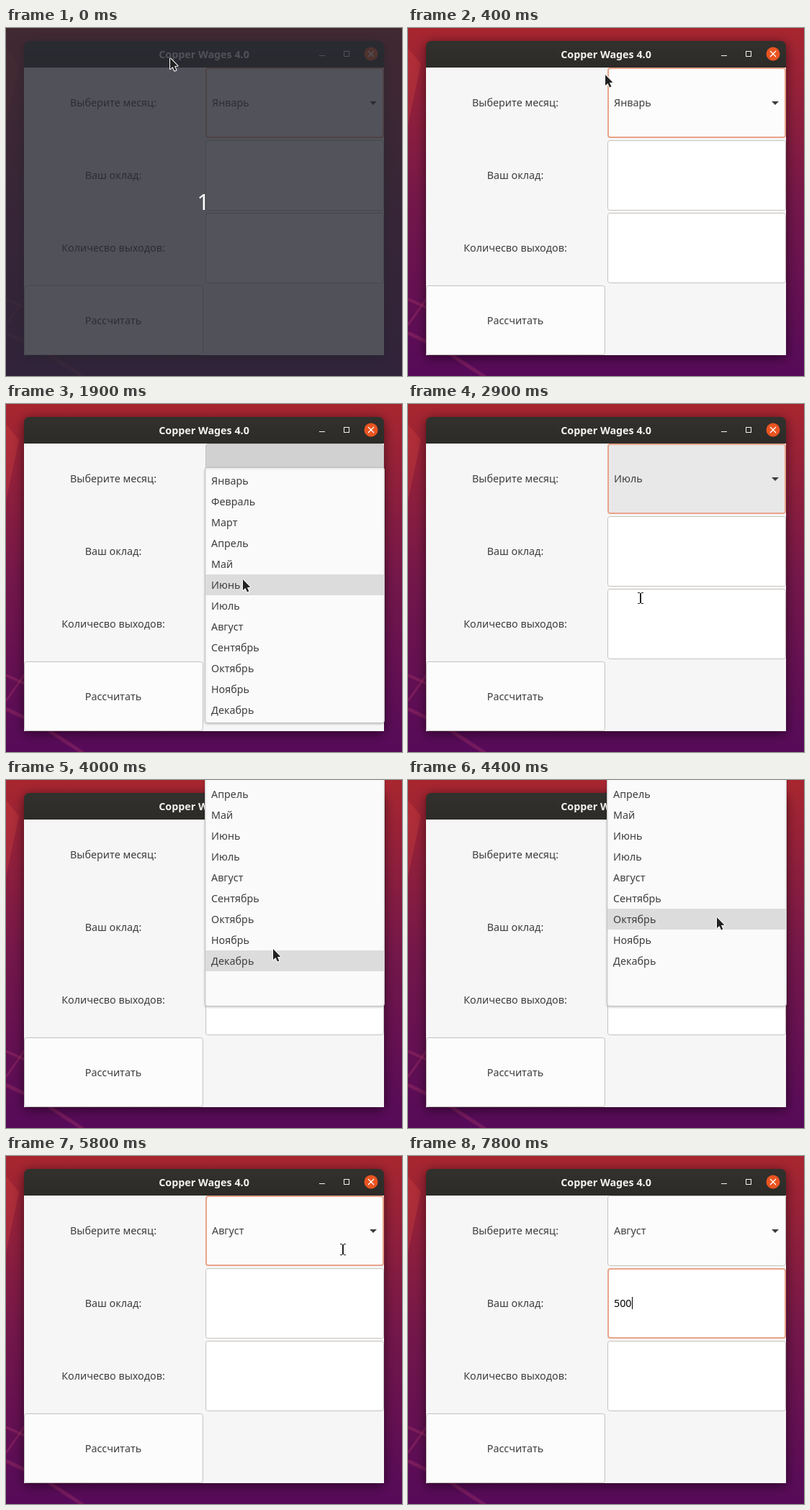
Recreate the animation shown at these times as an HTML page with a canvas. Size 550 px wide and 484 px high, loop 8000 ms.

```html
<!DOCTYPE html>
<html lang="ru">
<head>
<meta charset="utf-8">
<title>Copper Wages 4.0</title>
<style>
  html, body { margin: 0; width: 100%; height: 100%; overflow: hidden; background: #560a59; }
  canvas { display: block; }
</style>
</head>
<body>
<canvas id="stage" width="550" height="484"></canvas>
<script>
const ctx = document.getElementById('stage').getContext('2d');
const WIDTH = 550, HEIGHT = 484, LOOP = 8000, STEP = 100;
const ROW = 29, PITCH = 101, LEFT = 277, PAD = 4;
const INK = '#3d3d3d', PAPER = '#fcfcfc', EDGE = '#c6c2be', FOCUS = '#e9a48b', LIGHT = '#f4f3f1';
const MONTHS = ['Январь', 'Февраль', 'Март', 'Апрель', 'Май', 'Июнь',
  'Июль', 'Август', 'Сентябрь', 'Октябрь', 'Ноябрь', 'Декабрь'];

const GLIDES = [
  { from: 300, to: 800, x: 355, y: 104 },
  { from: 1600, to: 2100, x: 323, y: 270 },
  { from: 3200, to: 3500, x: 365, y: 131 },
  { from: 3900, to: 4100, x: 371, y: 268 },
  { from: 4100, to: 5000, x: 474, y: 128 },
  { from: 5400, to: 5800, x: 468, y: 130 },
  { from: 5800, to: 6500, x: 324, y: 187 }
];
const MENUS = [
  { from: 1400, to: 2900, selected: 0, picked: 6, slack: 0 },
  { from: 3700, to: 5400, selected: 6, picked: 7, slack: 45 }
];
const FOCUS_ENTRY = 6400, TYPING = 7500;

const within = (t, from, to) => t >= from && t < to;
const easeOut = k => 1 - (1 - k) ** 2;

function pointerAt(t) {
  let x = 227, y = 41;
  for (const glide of GLIDES) {
    const k = easeOut(Math.min(1, Math.max(0, (t - glide.from) / (glide.to - glide.from))));
    x += (glide.x - x) * k;
    y += (glide.y - y) * k;
  }
  return [Math.round(x), Math.round(y)];
}

function rect(x, y, w, h, color) {
  ctx.fillStyle = color;
  ctx.fillRect(x, y, w, h);
}

function text(str, x, y, color = INK, align = 'left', font = '14.3px') {
  ctx.font = font + ' "Noto Sans", sans-serif';
  ctx.textAlign = align;
  ctx.fillStyle = color;
  ctx.fillText(str, x, y);
}

function trace(points) {
  ctx.beginPath();
  points.forEach(([x, y]) => ctx.lineTo(x, y));
}

function fill(points, color) {
  trace(points);
  ctx.fillStyle = color;
  ctx.fill();
}

function stroke(points, color, width) {
  trace(points);
  ctx.strokeStyle = color;
  ctx.lineWidth = width;
  ctx.stroke();
}

function box(x, y, w, h, color, edge = EDGE, line = 1) {
  ctx.beginPath();
  ctx.roundRect(x + line / 2, y + line / 2, w - line, h - line, 3);
  ctx.fillStyle = color;
  ctx.fill();
  ctx.strokeStyle = edge;
  ctx.lineWidth = line;
  ctx.stroke();
}

function field(row, color, focused) {
  box(LEFT, 55 + row * PITCH, 248, 98, color, focused ? FOCUS : EDGE, focused ? 2 : 1);
}

function gradient(y0, y1, ...colors) {
  const g = ctx.createLinearGradient(0, y0, 0, y1);
  colors.forEach((color, i) => g.addColorStop(i / (colors.length - 1), color));
  return g;
}

function withShadow(alpha, blur, offset, paint) {
  ctx.save();
  ctx.shadowColor = `rgba(0,0,0,${alpha})`;
  ctx.shadowBlur = blur;
  ctx.shadowOffsetY = offset;
  paint();
  ctx.restore();
}

function wallpaper() {
  rect(0, 0, WIDTH, HEIGHT, gradient(0, HEIGHT, '#a8262f', '#74174a', '#560a59'));
  fill([[0, 28], [18, 50], [0, 135]], 'rgba(215,70,65,.3)');
  const streak = 'rgba(190,60,110,.3)';
  stroke([[0, 377], [26, 389]], streak, 4);
  stroke([[0, 413], [26, 376]], streak, 3);
  stroke([[0, 424], [50, 448], [108, 486]], streak, 5);
}

function windowFrame() {
  withShadow(0.55, 16, 3, () => {
    ctx.beginPath();
    ctx.roundRect(25, 18, 500, 437, [7, 7, 0, 0]);
    ctx.fillStyle = gradient(18, 55, '#32312d', '#2c2b28');
    ctx.fill();
  });
  rect(25, 55, 500, 400, '#f6f6f6');
  text('Copper Wages 4.0', 275, 42, LIGHT, 'center', 'bold 14.3px');

  rect(435, 38, 8, 1, LIGHT);
  ctx.strokeStyle = LIGHT;
  ctx.lineWidth = 1;
  ctx.strokeRect(469.5, 32.5, 7, 7);
  ctx.beginPath();
  ctx.arc(507, 36, 9.5, 0, Math.PI * 2);
  ctx.fillStyle = '#e95420';
  ctx.fill();
  for (const side of [-4, 4]) stroke([[507 - side, 32], [507 + side, 40]], '#fff', 1.3);
}

function comboFill(t, menu) {
  if (menu) return '#d1d1d1';
  if (MENUS.some(m => within(t, m.to, m.to + 200))) return '#e8e8e8';
  if (MENUS.some(m => within(t, m.from - 400, m.from))) return '#fff';
  return PAPER;
}

function form(t, menu) {
  ['Выберите месяц:', 'Ваш оклад:', 'Количесво выходов:', 'Рассчитать'].forEach((label, row) => {
    if (row === 3) box(25, 358, 249, 97, PAPER);
    text(label, 149, 109 + row * PITCH, INK, 'center');
  });

  const editing = t >= FOCUS_ENTRY;
  field(0, comboFill(t, menu), !editing && !menu);
  const month = MENUS.reduce((current, m) => t >= m.to ? m.picked : current, 0);
  text(MONTHS[month], 286, 109);
  fill([[505, 102], [515, 102], [510, 107]], INK);

  field(1, '#fff', editing);
  field(2, '#fff', false);
  if (editing) entry(t);
}

function entry(t) {
  const typed = t < TYPING ? '' : '500'.slice(0, 1 + Math.ceil((t - TYPING) / 200));
  text(typed, 286, 210, '#000');
  const caretOn = t >= TYPING || t < FOCUS_ENTRY + 800;
  if (caretOn) rect(286 + Math.round(ctx.measureText(typed).width), 196, 1, 17, '#000');
}

function dropDown({ selected, slack }, pointerY) {
  const list = 92 - selected * ROW;
  const height = MONTHS.length * ROW + 2 * PAD + slack;
  withShadow(0.2, 3, 1, () => box(LEFT - 1, list - PAD, 250, height, '#fafafa', '#c4c4c4'));
  // The highlight runs slightly ahead of the drawn pointer.
  const active = Math.min(MONTHS.length - 1, Math.floor((pointerY + 8 - list) / ROW));
  rect(LEFT, list + active * ROW, 248, ROW, '#dcdcdc');
  MONTHS.forEach((month, i) => text(month, 285, list + i * ROW + 20));
}

function arrow(x, y) {
  ctx.save();
  ctx.translate(x, y);
  ctx.lineJoin = 'round';
  const shape = [[1, 1], [1, 16], [4.5, 13], [7, 18.5], [9.4, 17.5], [7, 12], [11.5, 11.7], [1, 1]];
  stroke(shape, '#fff', 2);
  fill(shape, '#222');
  ctx.restore();
}

function beam(x, y) {
  for (const [grow, color] of [[1, 'rgba(255,255,255,.8)'], [0, '#222']]) {
    const bar = (dx, dy, w, h) =>
      rect(x + dx - grow, y + dy - grow, w + 2 * grow, h + 2 * grow, color);
    bar(-1, -7, 2, 14);
    for (const dy of [-8, 7]) for (const dx of [-4, 1]) bar(dx, dy, 3, 1);
  }
}

function draw(now) {
  const t = Math.floor((now % LOOP) / STEP) * STEP;
  const menu = MENUS.find(m => within(t, m.from, m.to));
  const [x, y] = pointerAt(t);

  wallpaper();
  windowFrame();
  form(t, menu);
  if (menu) dropDown(menu, y);
  if (t < 100) {
    rect(0, 0, WIDTH, HEIGHT, 'rgba(40,42,50,.8)');
    text('1', 274, 253, '#fff', 'center', '30px');
  }
  const overText = within(t, MENUS[0].to, 3500) || t >= MENUS[1].to;
  if (t < TYPING) (overText ? beam : arrow)(x, y);
}

const start = performance.now();
function tick() {
  draw(performance.now() - start);
  requestAnimationFrame(tick);
}
tick();
</script>
</body>
</html>
```
